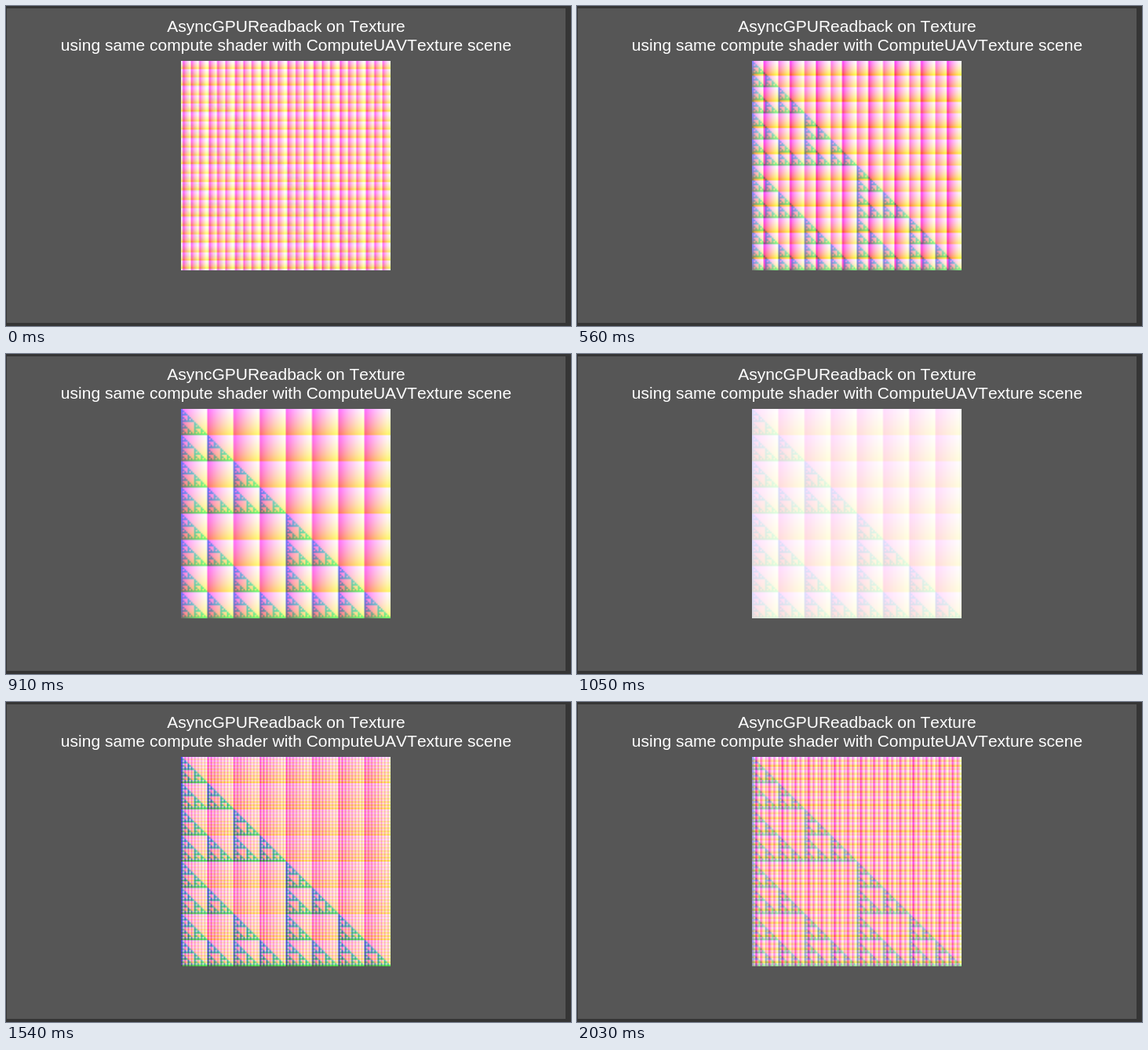
An HTML page with a canvas that plays this animation: 720 by 408 pixels, repeating every 2.1 s.

```html
<!DOCTYPE html>
<html lang="en">
<head>
<meta charset="utf-8">
<title>Compute texture</title>
<style>
html, body { margin: 0; width: 720px; height: 408px; overflow: hidden; background: #353535; }
.panel { position: absolute; left: 1px; top: 3px; width: 712px; height: 401px; background: #565656; }
svg, canvas { position: absolute; }
svg { left: 0; top: 0; }
canvas { left: 223px; top: 70px; width: 267px; height: 267px; }
text { font: 21px "Liberation Sans", Arial, sans-serif; font-kerning: none; fill: #fff; text-anchor: middle; }
</style>
</head>
<body>
<div class="panel"></div>
<svg width="720" height="408">
  <text x="357" y="33">AsyncGPUReadback on Texture</text>
  <text x="357" y="57">using same compute shader with ComputeUAVTexture scene</text>
</svg>
<canvas id="tex" width="128" height="128"></canvas>
<script>
const SIZE = 128, STEP = 70, LOOP = 2100;
const ctx = document.getElementById('tex').getContext('2d');
const image = ctx.createImageData(SIZE, SIZE);

// [time in ms, fade distance]; the fade restarts at 1190 ms
const keys = [[0, 3.1], [350, 1.91], [700, 1.7], [1050, 0.28], [1120, 0.1],
              [1190, 8.15], [1260, 8.07], [1540, 7.94], [2030, 5.7]];

function fadeAt(time) {
  const i = keys.findIndex(key => key[0] >= time);
  if (keys[i][0] === time) return keys[i][1];
  const [t0, a] = keys[i - 1], [t1, b] = keys[i];
  return a + (b - a) * (time - t0) / (t1 - t0);
}

// A channel fades from 1 at speed (1 - base), wraps below 0, then is gamma encoded
function shade(base, fade) {
  const v = 1 - fade * (1 - base);
  const linear = base === 1 ? 1 : v - Math.floor(v);
  return 255 * linear ** (1 / 2.2);
}

function draw(time) {
  const fade = fadeAt(time);
  const ramp = Array.from({ length: 16 }, (_, i) => shade(i / 15, fade));
  for (let y = 0; y < SIZE; y++) {
    for (let x = 0; x < SIZE; x++) {
      const p = ((SIZE - 1 - y) * SIZE + x) * 4;
      image.data[p] = x & y ? 255 : ramp[0];
      image.data[p + 1] = ramp[x & 15];
      image.data[p + 2] = ramp[y & 15];
      image.data[p + 3] = 255;
    }
  }
  ctx.putImageData(image, 0, 0);
}

function tick() {
  draw(Math.floor(performance.now() % LOOP / STEP) * STEP);
  requestAnimationFrame(tick);
}
tick();
</script>
</body>
</html>
```
